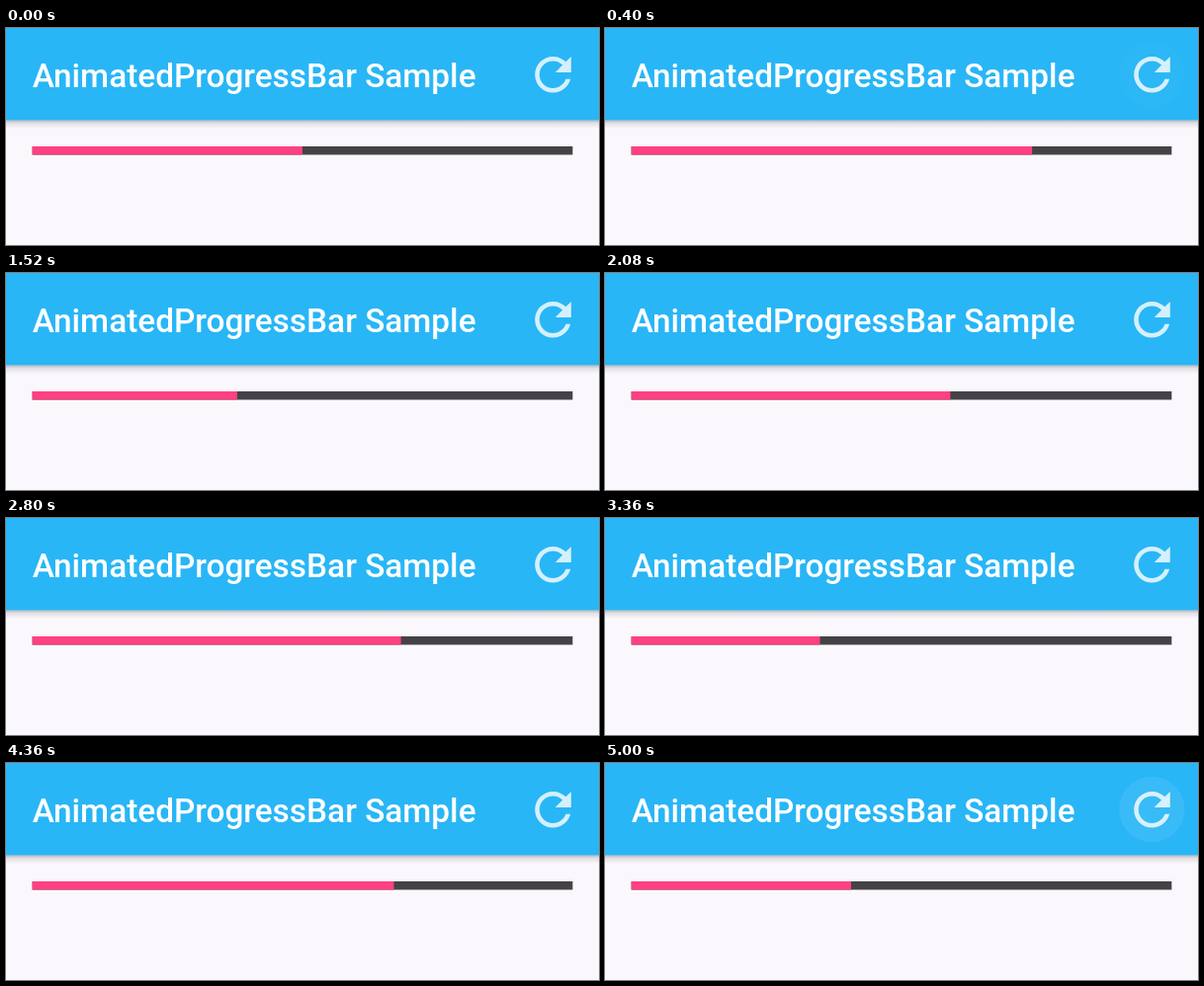
Recreate the animation shown at these times as an HTML page. Size 600 px wide and 220 px high, loop 5040 ms.

```html
<!DOCTYPE html>
<html lang="en">
<head>
<meta charset="utf-8">
<title>Progress bar sample</title>
<style>
  html, body { margin: 0; width: 100%; height: 100%; overflow: hidden; background: #faf8fc; }
  svg { display: block; width: 600px; height: 220px; }
  text { font: 500 33.33px Roboto, sans-serif; fill: #fff; }
</style>
</head>
<body>
<svg viewBox="0 0 600 220">
  <defs>
    <linearGradient id="shadow" x2="0" y2="1">
      <stop offset="0" stop-color="#000" stop-opacity=".27"/>
      <stop offset=".35" stop-color="#000" stop-opacity=".1"/>
      <stop offset="1" stop-color="#000" stop-opacity="0"/>
    </linearGradient>
  </defs>
  <rect width="600" height="220" fill="#faf8fc"/>
  <rect y="93.3" width="600" height="9" fill="url(#shadow)"/>
  <rect width="600" height="93.5" fill="#29b6f6"/>
  <text x="26.67" y="60">AnimatedProgressBar Sample</text>
  <circle id="ripple" cx="553.3" cy="47" fill="#fff"/>
  <path transform="translate(526 19.8) scale(2.29)" fill="#fff" fill-opacity=".8"
    d="M17.65 6.35C16.2 4.9 14.21 4 12 4c-4.42 0-7.99 3.58-7.99 8s3.57 8 7.99 8c3.73 0 6.84-2.55 7.73-6h-2.08c-.82 2.33-3.04 4-5.65 4-3.31 0-6-2.69-6-6s2.69-6 6-6c1.66 0 3.14.69 4.22 1.78L13 11h7V4l-2.35 2.35z"/>
  <rect x="26.67" y="120" width="546.67" height="8.5" fill="#444246"/>
  <rect id="progress" x="26.67" y="120" height="8.5" fill="#ff4081"/>
</svg>
<script>
  const LOOP = 5040, STEP = 40, LEFT = 26.67;
  const progress = document.getElementById('progress');
  const ripple = document.getElementById('ripple');

  // Each tap sends the bar's right edge to a new position.
  const taps = [
    { start: 0, duration: 570, from: 300, to: 466 },
    { start: 900, duration: 610, from: 466, to: 234 },
    { start: 1625, duration: 725, from: 234, to: 400 },
    { start: 2785, duration: 540, from: 400, to: 217.5 },
    { start: 3860, duration: 495, from: 217.5, to: 392.5 },
    { start: 4740, duration: 500, from: 392.5, to: 122.5 }
  ];

  const clamp = v => Math.min(1, Math.max(0, v));
  const easeInOut = p => (1 - Math.cos(Math.PI * p)) / 2;

  function draw(time) {
    const tap = taps.findLast(({ start }) => start <= time);
    const age = time - tap.start;
    const edge = tap.from + (tap.to - tap.from) * easeInOut(clamp(age / tap.duration));
    progress.setAttribute('width', edge - LEFT);

    const grow = clamp(age / 200);
    ripple.setAttribute('r', 33.3 * (1 - (1 - grow) ** 2));
    ripple.setAttribute('fill-opacity', 0.07 * clamp(age / 80) * clamp((440 - age) / 180));
  }

  const origin = performance.now();
  function tick() {
    const time = (performance.now() - origin) % LOOP;
    draw(Math.floor(time / STEP) * STEP);
    requestAnimationFrame(tick);
  }
  tick();
</script>
</body>
</html>
```
